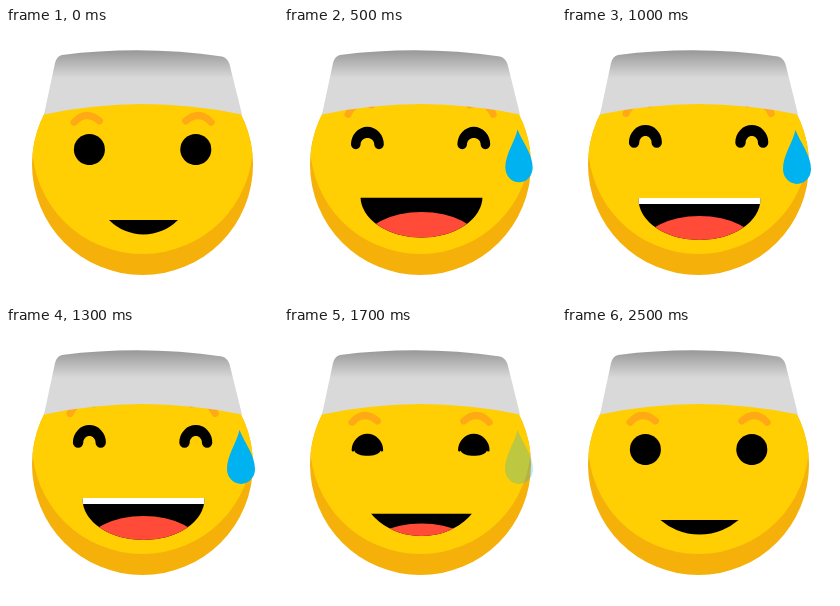
Recreate the animation shown at these times as an HTML page with a canvas. Size 272x272 px, loop 2.7 s.

```html
<!DOCTYPE html>
<html lang="en">
<head>
<meta charset="utf-8">
<title>Nervous laugh</title>
<style>
html, body { margin: 0; width: 100%; height: 100%; overflow: hidden; background: #fff; }
canvas { display: block; width: 272px; height: 272px; }
</style>
</head>
<body>
<canvas id="stage" width="272" height="272"></canvas>
<script>
const ctx = document.getElementById('stage').getContext('2d');
const LOOP = 2700, STEP = 100, MID = 136.6;
const LAUGH_END = 1300;

const lerp = (a, b, k) => a + (b - a) * k;

function ease(t, from, to) {
  const x = Math.min(1, Math.max(0, (t - from) / (to - from)));
  return x * x * (3 - 2 * x);
}

// Rises from one time to another, then falls from the end of the laugh.
const swell = (t, from, to, rest) => ease(t, from, to) - ease(t, LAUGH_END, rest);

function ellipse(x, y, rx, ry, color) {
  ctx.beginPath();
  ctx.ellipse(x, y, rx, ry, 0, 0, Math.PI * 2);
  ctx.fillStyle = color;
  ctx.fill();
}

function mirrored(draw) {
  draw();
  ctx.save();
  ctx.translate(MID * 2, 0);
  ctx.scale(-1, 1);
  draw();
  ctx.restore();
}

function face() {
  ctx.save();
  ellipse(136.5, 136.5, 110.5, 110.5, '#f5b00a');
  ctx.clip();
  ellipse(136.5, 115.5, 110.5, 110.5, '#ffce03');
  ctx.restore();
}

function hat() {
  const shade = ctx.createLinearGradient(0, 22, 0, 50);
  shade.addColorStop(0, '#979797');
  shade.addColorStop(1, '#d9d9d9');
  ctx.fillStyle = shade;
  ctx.fill(new Path2D('M38 86.5L49 35Q50.5 28.5 56 27Q136.5 17 216 28.5Q221.5 30 223.5 36L236 86.5Q136.5 65.5 38 86.5Z'));
}

function brow(t) {
  const lift = swell(t, 0, 600, 1650), tilt = swell(t, 0, 300, 1500);
  ctx.save();
  ctx.translate(80 - 6 * tilt, 90 - 12.5 * lift);
  ctx.rotate(-0.33 * tilt);
  ctx.beginPath();
  ctx.moveTo(-12, 4.3);
  ctx.quadraticCurveTo(0, -8.5, 13.5, 3);
  ctx.lineWidth = 7;
  ctx.lineCap = 'round';
  ctx.strokeStyle = '#ffa915';
  ctx.stroke();
  ctx.restore();
}

// A disc whose lower edge is pushed up until only an arch is left.
function eye(laugh) {
  const squint = 1 - (1 - laugh) ** 2, hop = 9 * laugh ** 3;
  const x = 83.4, top = 106 - hop;
  const w = 15.5 + laugh, r = 5.2 * laugh, rx = w - 2 * r;
  const foot = lerp(121.5, 123.5, squint) - hop;
  const inner = lerp(137, 117, squint) - hop;
  const N = 32;
  ctx.beginPath();
  ctx.ellipse(x, foot, w, foot - top, 0, Math.PI, Math.PI * 2);
  ctx.arc(x + w - r, foot, r, 0, Math.PI);
  for (let i = 0; i <= N; i++) {
    const a = Math.PI * i / N;
    ctx.lineTo(x + rx * Math.cos(a), foot - (foot - inner) * Math.sin(a));
  }
  ctx.arc(x - w + r, foot, r, 0, Math.PI);
  ctx.fillStyle = '#000';
  ctx.fill();
}

function mouth(t, laugh) {
  const bowl = Math.min(1, 2 * laugh);
  const sink = swell(t, 800, 1000, 1500);
  const top = 192 - 24 * laugh + 2 * sink;
  const teeth = 4 * swell(t, 600, 800, 1500) + 2 * sink;
  const smile = lerp(48, 60, ease(t, 0, 600));
  const ry = lerp(smile, 41, bowl);
  const bottom = lerp(206.5, 209.5, bowl) + 2.5 * sink;

  ctx.save();
  ctx.beginPath();
  ctx.rect(0, top, 272, 272 - top);
  ctx.clip();
  ellipse(137.5, bottom - ry, lerp(smile, 61, bowl), ry, '#000');
  ctx.clip();
  ellipse(137.5, 238 - 24 * bowl + 4 * sink, 57, 30, '#ff4b38');
  ctx.fillStyle = '#fff';
  ctx.fillRect(60, top, 150, teeth);
  ctx.restore();
}

function drop(t) {
  const size = lerp(.68, 1, ease(t, 0, 600));
  ctx.save();
  ctx.globalAlpha = swell(t, 0, 450, 1900);
  ctx.translate(235, 121 + ease(t, 800, 1000));
  ctx.scale(size, size);
  ctx.fillStyle = '#00b2f0';
  ctx.fill(new Path2D('M-1.5 -20C-4 -8 -14 5 -14 19A14 15 0 0 0 14 19C14 5 3 -8 -1.5 -20Z'));
  ctx.restore();
}

function frame(now) {
  const t = Math.floor(now % LOOP / STEP) * STEP;
  const laugh = swell(t, 0, 600, 1900);
  ctx.fillStyle = '#fff';
  ctx.fillRect(0, 0, 272, 272);
  face();
  mirrored(() => brow(t));
  hat();
  mirrored(() => eye(laugh));
  mouth(t, laugh);
  drop(t);
}

let start = null;
function tick(now) {
  if (start === null) start = now;
  frame(now - start);
  requestAnimationFrame(tick);
}
frame(0);
requestAnimationFrame(tick);
</script>
</body>
</html>
```
